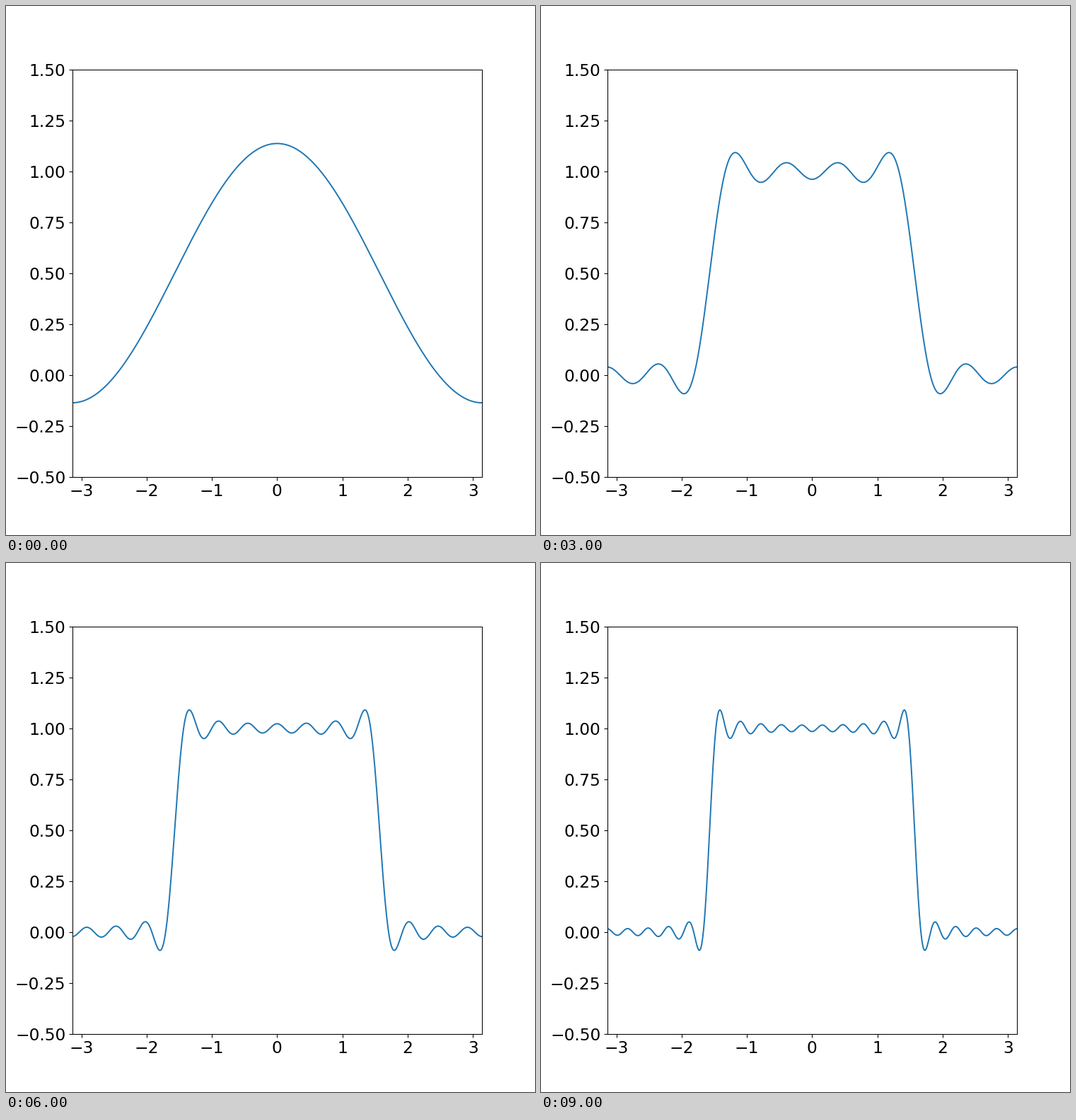
A matplotlib script that plays this animation: 748 by 748 pixels, repeating every 10000 ms.

```python
import numpy as np
import matplotlib.pyplot as plt
from matplotlib.animation import FuncAnimation

FRAMES = 10
SIZE = 8
DPI = 748 / SIZE

plt.rcParams.update({"font.family": "DejaVu Sans", "font.size": 18})

x = np.linspace(-np.pi, np.pi, 1000)


def partial_sum(terms):
    """Fourier partial sum of a square pulse on [-pi/2, pi/2]."""
    k = np.arange(terms)[:, None]
    odd = 2 * k + 1
    return 0.5 + 2 / np.pi * ((-1.0) ** k * np.cos(odd * x) / odd).sum(axis=0)


fig, ax = plt.subplots(figsize=(SIZE, SIZE), dpi=DPI)
fig.subplots_adjust(left=0.125, right=0.9, bottom=0.11, top=0.88)
ax.set_xlim(-np.pi, np.pi)
ax.set_ylim(-0.5, 1.5)
ax.set_xticks(range(-3, 4))
ax.set_yticks(np.arange(-0.5, 1.51, 0.25))
line, = ax.plot(x, partial_sum(1), color="#1f77b4", linewidth=1.5)


def update(i):
    line.set_ydata(partial_sum(i + 1))
    return line,


anim = FuncAnimation(fig, update, frames=FRAMES, interval=1000, repeat=True,
                     repeat_delay=0, blit=False)
plt.show()
```
